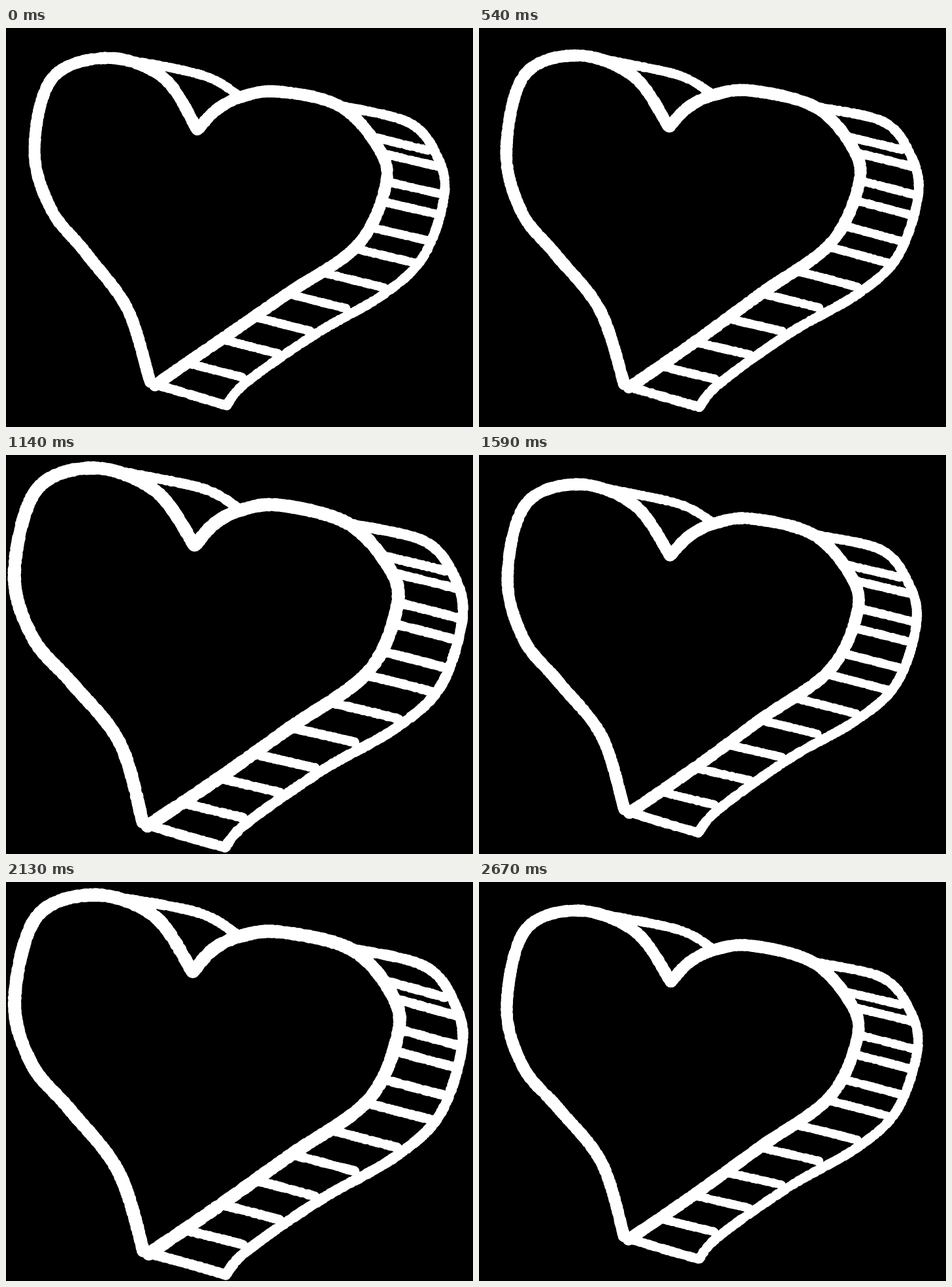
These frames come from a looping animation (715 px wide and 610 px high, 2.7 s). An HTML page with a canvas:

```html
<!DOCTYPE html>
<html lang="en">
<head>
<meta charset="utf-8">
<title>Beating heart</title>
<style>
  html, body { margin: 0; width: 100%; height: 100%; overflow: hidden; background: #000; }
  canvas { display: block; }
</style>
</head>
<body>
<canvas id="stage" width="715" height="610"></canvas>
<script>
const ctx = document.getElementById('stage').getContext('2d');
const WIDTH = 715, HEIGHT = 610;
const LOOP = 2700, TICK = 30, BEAT = 900, PULSE = 600, BOIL = 90;
const RUNGS = 11, RUNG_SLOPE = 0.25;

const hash = n => {
  const v = Math.sin(n * 127.1 + 11.7) * 43758.5453;
  return v - Math.floor(v);
};

// Catmull-Rom curve as closely spaced points
function curve(...points) {
  const out = [];
  for (let i = 0; i < points.length - 1; i++) {
    const a = points[Math.max(i - 1, 0)], b = points[i];
    const c = points[i + 1], d = points[Math.min(i + 2, points.length - 1)];
    const steps = Math.ceil(Math.hypot(c[0] - b[0], c[1] - b[1]) / 1.5);
    for (let s = 0; s <= steps; s++) {
      const u = s / steps;
      out.push([0, 1].map(k => b[k] + 0.5 * u * (c[k] - a[k]
        + u * (2 * a[k] - 5 * b[k] + 4 * c[k] - d[k]
        + u * (3 * (b[k] - c[k]) + d[k] - a[k])))));
    }
  }
  return out;
}

const leftLobe = curve([293, 153], [240, 76], [155, 45], [72, 76], [43, 190],
  [68, 280], [122, 345], [188, 430], [222, 541]);
const rightLobe = curve([294, 153], [322, 123], [360, 104], [415, 97], [510, 120],
  [567, 180], [580, 237], [538, 330], [430, 406], [330, 477], [229, 546]);
const backTop = curve([160, 44], [299, 71], [355, 101]);
const backSide = curve([515, 121], [616, 145], [658, 195], [670, 255], [640, 348],
  [578, 407], [474, 467], [368, 541], [337, 576]);
const base = curve([224, 543], [337, 576]);

// Rungs leave the right lobe at near-even heights; the upper ones pair up
function rung(i) {
  const y = 161 + 35.2 * i + 6 * (-1) ** i * Math.exp(-i / 3);
  const run = 86 + 13 * Math.exp(-((i - 5.5) ** 2) / 2);
  const [x] = rightLobe.find(p => p[1] >= y);
  return curve([x, y - 1], [x + run, y - 1 + run * RUNG_SLOPE]);
}

const strokes = [
  { dabs: leftLobe, radius: 9.1 },
  { dabs: rightLobe, radius: 9.1 },
  { dabs: backTop, radius: 7 },
  { dabs: backSide, radius: 7.4 },
  { dabs: base, radius: 7.2 },
  ...Array.from({ length: RUNGS }, (_, i) => ({ dabs: rung(i), radius: 6.6 }))
];

function wobble(x, y, seed) {
  const wave = (k, v) => Math.sin(v + hash(seed * 8 + k) * Math.PI * 2);
  return [
    x + 1.2 * wave(1, x / 75 + y / 120) + 0.8 * wave(2, y / 48 - x / 90),
    y + 1.2 * wave(3, x / 110 - y / 80) + 0.8 * wave(4, x / 50 + y / 85)
  ];
}

function pulse(t) {
  const phase = t % BEAT;
  return phase < PULSE ? (1 - Math.cos(phase / PULSE * Math.PI * 2)) / 2 : 0;
}

function draw(t) {
  const seed = Math.floor((t + TICK) / BOIL);
  const scale = 1 + 0.1 * pulse(t);
  ctx.setTransform(1, 0, 0, 1, 0, 0);
  ctx.fillStyle = '#000';
  ctx.fillRect(0, 0, WIDTH, HEIGHT);
  ctx.translate(WIDTH / 2, HEIGHT / 2);
  ctx.scale(scale, scale);
  ctx.translate(-WIDTH / 2, -HEIGHT / 2);
  ctx.fillStyle = '#fff';
  ctx.beginPath();
  let n = seed * 5000;
  for (const { dabs, radius } of strokes) {
    for (const [px, py] of dabs) {
      const [x, y] = wobble(px, py, seed);
      const r = radius + (hash(n++) - 0.6) * 1.3;
      ctx.moveTo(x + r, y);
      ctx.arc(x, y, r, 0, Math.PI * 2);
    }
  }
  ctx.fill();
}

const start = performance.now();
let shown = -1;
function frame() {
  const t = Math.floor((performance.now() - start) % LOOP / TICK) * TICK;
  if (t !== shown) draw(shown = t);
  requestAnimationFrame(frame);
}
frame();
</script>
</body>
</html>
```
